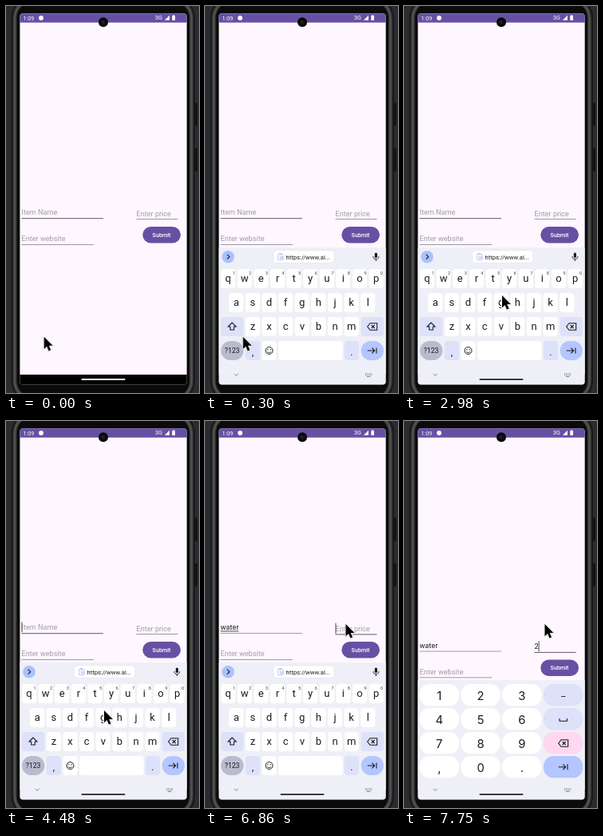
Recreate the animation shown at these times as an HTML page. Size 242 px wide and 484 px high, loop 8 s.

```html
<!DOCTYPE html>
<html lang="en">
<head>
<meta charset="utf-8">
<title>Phone form</title>
<style>
  html, body { margin: 0; width: 100%; height: 100%; overflow: hidden; background: #2b2c30; }
  svg { display: block; width: 100%; height: 100%; }
  text { font-family: Roboto, sans-serif; white-space: pre; }
  #numbers text { font-family: Inter, sans-serif; }
  #pointer { paint-order: stroke; filter: drop-shadow(.3px .8px .7px #0006); }
</style>
</head>
<body>
<svg id="stage" viewBox="0 0 242 484" preserveAspectRatio="none"></svg>
<script>
const LOOP = 8000;
const INK = '#1b1b21', PURPLE = '#6750a4', TINT = '#dde1f9', ACCENT = '#b3c6ff';
const HINT = '#a19ca5', TYPED = '#1d1b20', FAINT = '#74757d';

const rect = (x, y, w, h, fill, r = 0, extra = '') =>
  `<rect x="${x}" y="${y}" width="${w}" height="${h}" rx="${r}" fill="${fill}" ${extra}/>`;
const text = (x, y, size, str, fill = INK, extra = '') =>
  `<text x="${x}" y="${y}" font-size="${size}" fill="${fill}" ${extra}>${str}</text>`;
const mid = (x, y, size, str, fill = INK, extra = '') =>
  text(x, y, size, str, fill, `text-anchor="middle" ${extra}`);
const circle = (x, y, r, fill, extra = '') =>
  `<circle cx="${x}" cy="${y}" r="${r}" fill="${fill}" ${extra}/>`;
const stroke = (d, color = INK, width = 1.1) =>
  `<path d="${d}" fill="none" stroke="${color}" stroke-width="${width}"/>`;
const group = (id, body) => `<g id="${id}">${body}</g>`;

const backspace = (x, y) => stroke(`M${x - 6} ${y}l3.3 -4.3h8.7v8.6h-8.7z` +
  `M${x - 1} ${y - 2}l4 4m0 -4l-4 4`);
const nextArrow = (x, y) => stroke(`M${x - 6} ${y}h9m-3.3 -3.3l3.3 3.3l-3.3 3.3M${x + 5.3} ${y - 3.6}v7.2`);

function phone() {
  // Nested outlines, each inset from the phone's outer edge.
  const frame = (inset, fill) =>
    rect(6.5 + inset, -12 + inset, 230.5 - 2 * inset, 508 - 2 * inset, fill, 27 - inset);
  return rect(0, 0, 242, 484, '#2b2c30') +
    rect(237, 121, 3, 29, '#121315', 1) + rect(237, 178, 3, 29, '#121315', 1) +
    frame(0, '#161719') + frame(2, '#393a3a') + frame(3.8, '#5a5a57') +
    frame(5.2, '#3a3a38') + frame(7, '#0b0b0b');
}

function screen() {
  return rect(17, 9, 210, 465, '#fef7ff') +
    rect(17, 9, 210, 11.7, PURPLE) +
    text(21.5, 17.6, 7.2, '1:09', '#fff') + circle(44, 15, 2.9, '#fff') +
    text(187, 17.4, 7.2, '3G', '#fff') +
    '<path d="M205 11.8v6h-6z" fill="#fff"/>' +
    rect(208.3, 12, 3.7, 5.9, '#fff', .6) + rect(209.4, 11.2, 1.5, 1.2, '#fff') +
    rect(17, 461, 210, 13, '#000') + rect(94.5, 466.1, 55, 1.8, '#fff', .9);
}

function field(name, x, baseline, width, lineY) {
  return text(x, baseline, 9.15, '', HINT, `id="${name}Text"`) +
    rect(x, lineY, width, .6, '#605a64', 0, `id="${name}Line"`);
}

function form() {
  return field('item', 19.5, 261, 102.5, 265.2) + field('price', 163.5, 262.8, 52, 266.4) +
    field('site', 19.5, 294.4, 90.5, 298.1) +
    rect(19.5, 262.5, 23, .8, TYPED, 0, 'id="composing"') +
    rect(171.3, 276, 47.7, 20.6, PURPLE, 10.3) +
    mid(195, 288.9, 7.2, 'Submit', '#fff', 'font-weight="500"') +
    rect(0, 0, .9, 13, '#3b363f', 0, 'id="caret"');
}

function keyboardFooter() {
  let dots = '';
  for (let row = 0; row < 2; row++)
    for (let col = 0; col < 5; col++) dots += rect(201 + col * 1.8, 459.3 + row * 1.8, 1, 1, FAINT);
  return stroke('M36.8 460l2.4 2.4l2.4 -2.4', FAINT, .9) + dots + rect(202.8, 463, 4.6, .9, FAINT);
}

function letterKeyboard() {
  const pitch = 20.63;
  let out = rect(17, 302, 210, 172, '#efeff7') +
    circle(29, 313.7, 7.8, '#a9c2fd') + stroke('M27.7 310.7l3 3l-3 3', INK, 1.1) +
    rect(85.5, 305.8, 76.5, 15.6, '#fff', 4, 'stroke="#dcdde6" stroke-width=".6"') +
    rect(91.3, 310, 6.6, 8, '#f0f2ff', 1, 'stroke="#c3caf0" stroke-width=".8"') +
    rect(93, 309, 3.2, 2, '#c3caf0') + stroke('M94 314h5m-5 2h5', '#a9b3e4', .7) +
    text(101.5, 316.6, 7.6, 'https://www.al...') +
    rect(212.8, 308.5, 3.2, 6.6, INK, 1.6) + stroke('M210.9 313c0 5 7 5 7 0M214.4 316.7v2.4', INK, .9);
  ['qwertyuiop', 'asdfghjkl', 'zxcvbnm'].forEach((letters, row) => {
    [...letters].forEach((letter, i) => {
      const x = [29, 39.2, 59.9][row] + i * pitch, y = 341 + row * 30;
      out += rect(x - 9.1, y - 12, 18.2, 24, '#fff', 4) + mid(x, y + 4.2, 13, letter);
      if (row === 0) out += mid(x + 7, y - 5.4, 5.6, (i + 1) % 10, '#44454d');
    });
  });
  return out +
    rect(20, 389, 28.3, 24, TINT, 4) +
    stroke('M34 396l-5 5h2.7v4h4.6v-4h2.7z') +
    rect(195.7, 389, 28.3, 24, TINT, 4) + backspace(209.7, 401) +
    rect(20, 419, 28.3, 24, '#b9bbce', 12) + mid(34.1, 434.4, 8.6, '?123') +
    rect(50.8, 419, 18.2, 24, TINT, 4) + mid(60, 436.6, 12, ',') +
    rect(71.4, 419, 18.2, 24, '#fff', 4) + circle(80.5, 431, 4.5, 'none', `stroke="${INK}"`) +
    circle(78.8, 429.8, .7, INK) + circle(82.2, 429.8, .7, INK) +
    stroke('M78 432.2c.8 2 4.2 2 5 0', INK, .9) +
    rect(92, 419, 80.7, 24, '#fff', 4) +
    rect(174.8, 419, 18.2, 24, TINT, 4) + mid(183.9, 436.6, 12, '.') +
    rect(195.7, 419, 28.3, 24, ACCENT, 12) + nextArrow(209.7, 431) +
    keyboardFooter();
}

function numberKeyboard() {
  let out = rect(17, 324, 210, 150, '#efeff7');
  [...'123–456 789 ,0. '].forEach((label, i) => {
    const col = i % 4, row = i >> 2, x = 19.6 + col * 51.8, y = 329 + row * 30;
    const fill = col < 3 ? '#fff' : [TINT, TINT, '#ffd7f1', ACCENT][row];
    out += rect(x, y, 49.3, 27.3, fill, 12.5) +
      mid(x + 24.7, y + (col < 3 ? 19.6 : 18.6), col < 3 ? 14.8 : 11, label);
  });
  return out + stroke('M195 372v3.3h9.4v-3.3') + backspace(199.7, 403) + nextArrow(199.7, 432.7) +
    keyboardFooter();
}

document.getElementById('stage').innerHTML =
  '<clipPath id="glass"><rect x="17.4" y="9.3" width="209.3" height="464.2" rx="4"/></clipPath>' +
  phone() +
  '<g clip-path="url(#glass)">' + screen() + group('form', form()) +
  group('letters', letterKeyboard()) + group('numbers', numberKeyboard()) +
  rect(94.5, 466.1, 55, 1.8, '#3c3c41', .9, 'id="homeBar"') + '</g>' +
  circle(122, 20.3, 6, '#08080a') + circle(122, 20.3, 2.6, '#15171f') + circle(121.3, 19.6, .9, '#35394a') +
  '<path id="pointer" d="M0 0V15.2L3.5 12L5.9 17.6L8.6 16.4L6.2 11H11Z" fill="#000" stroke="#fff" stroke-width="2" stroke-linejoin="round"/>';

const el = id => document.getElementById(id);
const show = (id, on) => el(id).setAttribute('display', on ? 'inline' : 'none');
const move = (id, x, y) => el(id).setAttribute('transform', `translate(${x} ${y})`);

// Each track is a list of [start time, value]; values hold until the next entry.
const at = (track, t) => track.findLast(([start]) => t >= start)[1];

const pointerTrack = [
  [0, [47.7, 413.8]], [450, [72, 394]], [600, [106, 370]], [750, [121, 363]], [900, [123, 362]],
  [5960, [199, 354.5]], [6110, [231, 342]], [6260, [224, 313]], [6400, [203, 278]],
  [6560, [183, 258]], [6710, [176.5, 254]]
];
const caretTrack = [
  [0, false], [150, true], [300, false], [450, true], [900, false], [2380, true], [2980, false],
  [3430, true], [3880, false], [4480, true], [4930, false], [5070, true], [6710, false],
  [6860, true], [7450, false], [7750, true]
];
const itemTrack = [[0, ''], [5070, 'w'], [5520, 'wat'], [5670, 'water']];
const priceTrack = [[0, ''], [7750, '2']];
const hints = { item: 'Item Name', price: 'Enter price', site: 'Enter website' };

function setField(name, value, focused) {
  const label = el(name + 'Text');
  label.textContent = value || hints[name];
  label.setAttribute('fill', value ? TYPED : HINT);
  el(name + 'Line').setAttribute('height', focused ? 1 : .6);
  return value ? label.getComputedTextLength() : 0;
}

function render(t) {
  const onPrice = t >= 6860, numeric = t >= 7000;
  const item = at(itemTrack, t);
  const itemWidth = setField('item', item, !onPrice);
  const priceWidth = setField('price', at(priceTrack, t), onPrice);
  setField('site', '', false);

  show('composing', item && !numeric);
  el('composing').setAttribute('width', itemWidth);
  show('caret', at(caretTrack, t));
  if (onPrice) move('caret', 163.5 + priceWidth, 252.8);
  else move('caret', 19.5 + itemWidth, 251.3);

  move('form', 0, t >= 7150 ? 22.5 : 0);
  show('letters', t >= 150 && !numeric);
  move('letters', 0, t < 300 ? 40 : 0);
  show('numbers', numeric);
  show('homeBar', t >= 1940);
  move('pointer', ...at(pointerTrack, t));
}

const begin = performance.now();
function tick() {
  render((performance.now() - begin) % LOOP);
  requestAnimationFrame(tick);
}
tick();
</script>
</body>
</html>
```
